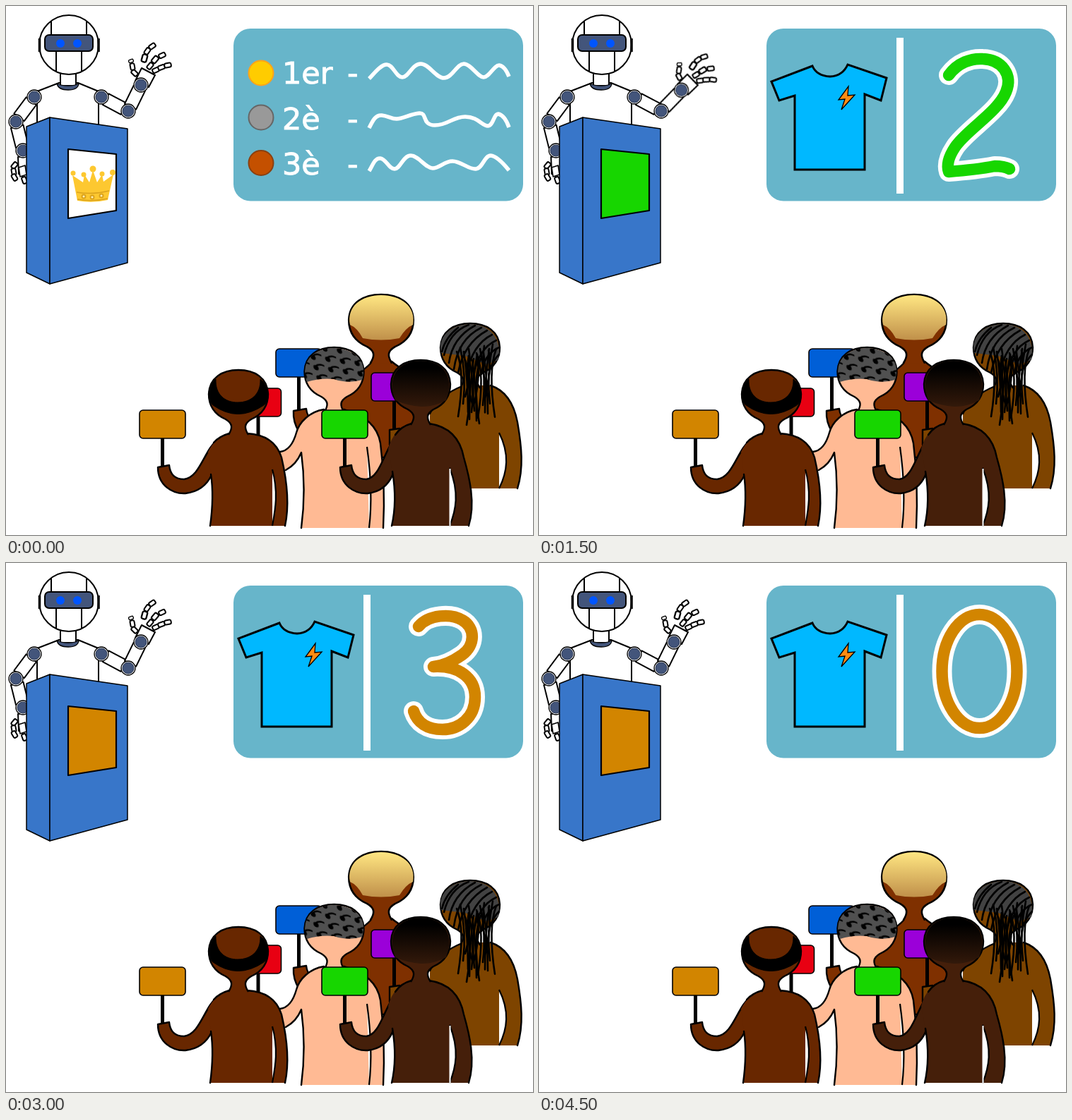
Write an HTML page without scripts that moves like this. It is 746 by 750 pixels and loops after 5000 ms.

```html
<!DOCTYPE html>
<html lang="fr">
<head>
<meta charset="utf-8">
<title>Enchères</title>
<style>
  html, body { margin: 0; width: 100%; height: 100%; overflow: hidden; background: #fff; }
  svg { display: block; width: 100vw; height: 100vh; }
  .line { fill: none; stroke: #000; stroke-linecap: round; }
  .robot { fill: #fff; stroke: #000; stroke-width: 2; stroke-linejoin: round; }
  .people { stroke: #000; stroke-width: 2.4; stroke-linejoin: round; }
  .skin { fill: currentColor; }
  .bare { stroke: none; }
  .gap { fill: #fff; stroke-width: 2.2; }
  .text { font: 43px "DejaVu Sans", sans-serif; fill: #fff; stroke: #fff; stroke-width: .9; }
  .wave { fill: none; stroke: #fff; stroke-width: 5.5; }
  .digit { fill: none; stroke-linecap: round; stroke-linejoin: round; }
  .rim { stroke: #fff; stroke-width: 28px; }
  .ink { stroke: currentColor; stroke-width: 16.5px; }

  .fore, .screen, .lot, .list, .sale, .three, .two, .one, .zero,
  .g-up, .g-down, .o-up, .o-down { animation: 5s step-end infinite; }
  .fore { transform-origin: 173px 149px; animation-name: fore; }
  .screen { animation-name: screen; }
  .lot { animation-name: lot; }
  .list { animation-name: list; }
  .sale { animation-name: sale; }
  .three { animation-name: three; }
  .two { animation-name: two; }
  .one { animation-name: one; }
  .zero { animation-name: zero; }
  .g-up { animation-name: g-up; }
  .g-down { animation-name: g-down; }
  .o-up { animation-name: o-up; }
  .o-down { animation-name: o-down; }

  @keyframes fore {
    0%, 60%, 100% { transform: rotate(0deg); }
    10%, 50% { transform: rotate(101deg); }
    20% { transform: rotate(18deg); }
  }
  @keyframes screen { 0%, 100% { fill: #fff; } 10% { fill: #17d600; } 50% { fill: #d28500; } }
  @keyframes lot { 0%, 100% { color: #17d600; } 50% { color: #d28500; } }
  @keyframes list { 0% { opacity: 1; } 10%, 100% { opacity: 0; } }
  @keyframes sale { 0% { opacity: 0; } 10%, 100% { opacity: 1; } }
  @keyframes three { 0%, 30%, 70%, 100% { opacity: 0; } 10%, 50% { opacity: 1; } }
  @keyframes two {
    0%, 40%, 80%, 100% { opacity: 0; transform: none; }
    30% { opacity: 1; transform: none; }
    70% { opacity: 1; transform: translateX(6px); }
  }
  @keyframes one { 0%, 50%, 90%, 100% { opacity: 0; } 40%, 80% { opacity: 1; } }
  @keyframes zero { 0% { opacity: 0; } 90%, 100% { opacity: 1; } }
  @keyframes g-up { 0%, 20%, 100% { opacity: 0; } 10% { opacity: 1; } }
  @keyframes g-down { 0%, 20%, 100% { opacity: 1; } 10% { opacity: 0; } }
  @keyframes o-up { 0%, 60%, 100% { opacity: 0; } 50% { opacity: 1; } }
  @keyframes o-down { 0%, 60%, 100% { opacity: 1; } 50% { opacity: 0; } }
</style>
</head>
<body>
<svg viewBox="0 0 746 750" preserveAspectRatio="none">
  <defs>
    <linearGradient id="blond" x2="0" y2="1">
      <stop stop-color="#ffe682"/><stop offset="1" stop-color="#c0904a"/>
    </linearGradient>
    <linearGradient id="fade" x2="0" y2="1">
      <stop offset=".15"/><stop offset="1" stop-color="#33190a"/>
    </linearGradient>
    <pattern id="curls" width="21" height="14" patternUnits="userSpaceOnUse" patternTransform="translate(428 488) rotate(8) skewX(24)">
      <rect width="21" height="14" fill="#505050"/>
      <path d="M3 9Q8 2 17 5" fill="none" stroke="#000" stroke-width="2.400"/>
      <circle cx="4" cy="9" r="3.600"/>
    </pattern>

    <rect id="limb" x="7" y="-9" width="29" height="18"/>
    <g id="joint"><circle r="10" stroke-width="1.300"/><circle r="8" fill="#43557b" stroke="#26334f" stroke-width="1"/></g>
    <rect id="seg" x="-4.700" y="-3" width="9.400" height="6" rx="2" stroke-width="2"/>

    <path id="d3" d="M584 90C598 73 630 71 646 81C665 92 664 117 646 130C633 139 618 146 605 147C640 145 664 162 664 190C664 220 641 236 618 236C596 236 582 226 577 210"/>
    <path id="d2" d="M580 98C593 80 612 74 628 75C656 76 671 98 661 122C650 150 605 176 589 200C579 215 577 226 580 235Q620 232 645 227Q658 227 666 231"/>
    <path id="d1" d="M591 102Q612 92 627 72C631 95 618 130 622 160Q624 195 619 229M592 232Q620 229 645 230"/>
    <ellipse id="d0" cx="623.500" cy="153.500" rx="53" ry="80.500"/>

    <g id="sign">
      <path d="M0-42V7" stroke-width="5"/>
      <rect x="-32.500" y="-80" width="65" height="40" rx="5" fill="currentColor" stroke-width="1.600"/>
    </g>
    <path id="head" class="skin" d="M-14 92C-8 82 -8 76 -18 70C-36 62 -42 49 -42 34C-41 11-23 0 0 0S41 11 42 34C42 49 36 62 18 70C8 76 8 82 14 92"/>
    <path id="lock" d="M0 0Q12 30 2 92M5-6Q14 35 9 74M10 0Q16 40 16 86M17-4Q22 25 12 64"/>
  </defs>

  <!-- Robot -->
  <g class="robot">
    <path d="M44 121L75 109H102L131 121V174H44Z"/>
    <path d="M77 94V113H99V94Z"/>
    <path d="M72 110Q74 119 88 119T103 110Q98 113 88 113T72 110Z" fill="#43557b" stroke-width="1.300"/>
    <circle cx="89" cy="55" r="42"/>
    <path d="M64 21V42M114 21V42M71 63V93M107 63V93"/>
    <path d="M47.500 46V65M131 46V65" stroke-width="3.500"/>
    <rect x="55" y="41" width="68" height="23" rx="6" fill="#43557b"/>
    <g fill="#0055ff" stroke="none"><circle cx="77" cy="53" r="6"/><circle cx="101" cy="53" r="6"/></g>

    <use href="#limb" transform="translate(40 129) rotate(126.600)"/>
    <use href="#limb" transform="translate(14 164) rotate(76)"/>
    <path d="M17 214L18 238L34 250V212Z"/>
    <path d="M18 229L27 226L29 239L20 242Z" stroke-width="1.600"/>
    <use href="#seg" transform="translate(12 226) rotate(-50)"/>
    <use href="#seg" transform="translate(11 235) rotate(80)"/>
    <use href="#seg" transform="translate(12 243) rotate(60)"/>
    <use href="#seg" transform="translate(26 247) rotate(70)"/>
    <use href="#joint" x="40" y="129"/>
    <use href="#joint" x="14" y="164"/>
    <use href="#joint" x="24" y="205"/>

    <use href="#limb" transform="translate(135 129) rotate(27.800)"/>
    <use href="#joint" x="135" y="129"/>
    <g class="fore">
      <use href="#limb" transform="translate(173 149) rotate(-64)"/>
      <path d="M192 88L211 98L202 115L183 106Z"/>
      <use href="#joint" x="191" y="112"/>
      <use href="#seg" transform="translate(182 95) rotate(45)"/>
      <use href="#seg" transform="translate(179 86) rotate(80)"/>
      <use href="#seg" transform="translate(177 78) rotate(-20) scale(.7)"/>
      <use href="#seg" transform="translate(196 74) rotate(-75) scale(1.150)"/>
      <use href="#seg" transform="translate(200 64) rotate(-55)"/>
      <use href="#seg" transform="translate(207 57) rotate(-35)"/>
      <use href="#seg" transform="translate(204 85) rotate(-50)"/>
      <use href="#seg" transform="translate(211 76) rotate(-50) scale(1.100)"/>
      <use href="#seg" transform="translate(221 70) rotate(-25)"/>
      <use href="#seg" transform="translate(212 91) rotate(-25)"/>
      <use href="#seg" transform="translate(220 87) rotate(-20)"/>
      <use href="#seg" transform="translate(229 84) rotate(-10)"/>
    </g>
    <use href="#joint" x="173" y="149"/>

    <g fill="#3876c9" stroke-width="1.500">
      <path d="M29 171L62 158V394L29 378Z"/>
      <path d="M62 158L172 174V364L62 394Z"/>
    </g>
    <path class="screen" d="M88 203L156 210V290L88 301Z" stroke-width="2.200"/>
    <g class="list" fill="#fdc830" stroke="none">
      <path d="M101 276L94 240L109 250L111 239L118 250L123 233L129 250L136 239L138 249L152 239L144 275Q122 280 101 276Z"/>
      <circle cx="95" cy="237" r="3.500"/><circle cx="110" cy="239" r="3.500"/><circle cx="123" cy="231" r="4.500"/>
      <circle cx="136" cy="238" r="3.500"/><circle cx="151" cy="236" r="4"/>
      <path d="M100 264Q122 268 146 262M101 274Q122 278 144 273" fill="none" stroke="#dba31d" stroke-width="1.500"/>
      <g fill="#fff0b8" stroke="#dba31d"><circle cx="110" cy="270" r="2.500"/><circle cx="122" cy="271" r="2.500"/><circle cx="135" cy="269" r="2.500"/></g>
    </g>
  </g>

  <!-- Board -->
  <rect x="322" y="32" width="410" height="244.500" rx="24" fill="#67b5ca"/>
  <g class="list">
    <g stroke-width="2">
      <circle cx="361" cy="95" r="17.500" fill="#ffcc00" stroke="#ffa31a"/>
      <circle cx="361" cy="158" r="17.500" fill="#999" stroke="#666"/>
      <circle cx="361" cy="222.500" r="17.500" fill="#c45000" stroke="#8a4010"/>
    </g>
    <g class="text">
      <text x="391" y="110">1er</text><text x="483" y="110">-</text>
      <text x="391" y="175">2è</text><text x="483" y="175">-</text>
      <text x="391" y="239">3è</text><text x="483" y="239">-</text>
    </g>
    <g class="wave">
      <path d="M514 103C521 96 530 83 539 83S552 101 561 101S575 82 587 82S608 102 620 102S638 82 648 82S668 101 676 101S691 84 698 84Q706 85 712 100"/>
      <path d="M514 173C519 163 523 154 532 155S545 160 553 160S573 153 585 152S588 169 607 169S632 157 650 157S674 170 682 170S690 153 697 153Q706 155 712 172"/>
      <path d="M514 234C519 226 522 215 530 216S542 231 550 231S562 212 573 212S594 230 604 230S620 220 632 220S655 232 665 231S677 212 686 212Q696 213 712 233"/>
    </g>
  </g>
  <g class="sale">
    <path d="M511 45V266" stroke="#fff" stroke-width="10"/>
    <path d="M387 85Q393 99 412 100Q430 99 437 83L492 102L484 134L461 125V232H362V127L340 134L329 107Z" fill="#00b8ff" stroke="#000" stroke-width="3"/>
    <path d="M438 114L424 133L433 132L428 147L447 126L437 127Z" fill="#ff8c12" stroke="#000" stroke-width="1.300"/>
  </g>
  <g class="lot digit">
    <g class="three"><use href="#d3" class="rim"/><use href="#d3" class="ink"/></g>
    <g class="two"><use href="#d2" class="rim"/><use href="#d2" class="ink"/></g>
    <g class="one"><use href="#d1" class="rim"/><use href="#d1" class="ink"/></g>
    <g class="zero"><use href="#d0" class="rim"/><use href="#d0" class="ink"/></g>
  </g>

  <!-- Audience -->
  <g class="people">
    <!-- blond -->
    <g color="#7f3000">
      <use href="#sign" x="414.500" y="566" color="#005fd7"/>
      <path class="skin" d="M407 574L425 571Q426 582 434 588L415 604Q406 590 407 574Z"/>
      <path class="skin" d="M518 504C510 518 475 528 474 560V640H590V530Q560 516 546 504Z"/>
      <use href="#head" transform="translate(531 409) scale(1.090 1.060)"/>
      <path d="M487 452C482 426 503 410 531 410S581 426 576 452Q566 456 557 471Q531 476 505 471Q497 456 487 452Z" fill="url(#blond)" class="bare"/>
    </g>

    <!-- dreadlocks -->
    <g color="#7e4400">
      <use href="#sign" x="549.500" y="600" color="#9b00d9"/>
      <path class="skin" d="M543 601L557 599V622H543Z"/>
      <path class="skin bare" d="M600 578Q612 552 648 538H686Q716 546 724 590C730 625 733 655 724 684H600Z"/>
      <path class="line" d="M600 578Q612 552 648 538M686 538Q716 548 724 590C730 625 733 655 724 684"/>
      <path class="gap" d="M698 605C713 635 710 660 698 684"/>
      <use href="#head" x="657" y="450"/>
      <path d="M616 492C610 466 634 451 657 451S703 466 697 502L680 508L650 496Z" fill="#424242" class="bare"/>
      <g class="line" stroke-width="2.600">
        <path d="M655 452Q628 462 620 495M664 453Q632 470 627 506M673 456Q640 472 634 515M681 460Q648 478 640 520M688 466Q660 480 652 522M694 474Q668 486 662 525M698 484Q676 494 673 522M640 456Q622 470 617 490M698 494Q684 508 683 530"/>
        <use href="#lock" x="638" y="490"/>
        <use href="#lock" x="650" y="502"/>
        <use href="#lock" x="666" y="492"/>
        <use href="#lock" transform="translate(694 486) scale(-1 1.050)"/>
        <use href="#lock" transform="translate(672 500) scale(-1 1)"/>
      </g>
    </g>

    <!-- curly -->
    <g color="#ffba94">
      <use href="#sign" x="357" y="622" color="#e80012"/>
      <path class="skin bare" d="M450 572C430 575 415 590 411 605Q404 630 388 632V660Q410 655 418 633C423 670 422 710 418 740H534C536 700 535 660 530 620Q524 584 478 572Z"/>
      <path class="line" d="M450 572C430 575 415 590 411 605Q404 630 388 632M396 658Q411 650 418 633C423 670 422 710 418 740M478 572Q524 584 530 620C535 660 536 700 534 740"/>
      <path class="gap" d="M511 625Q520 690 514 740"/>
      <use href="#head" x="464.500" y="484"/>
      <path d="M426 533C415 500 440 485 464 485S514 500 504 530Q485 536 464 529Q445 527 426 533Z" fill="url(#curls)" class="bare"/>
    </g>

    <!-- bald -->
    <g color="#682700">
      <g class="o-down">
        <use href="#sign" x="221.500" y="653" color="#d28500"/>
        <path class="skin" d="M300 614C280 630 275 668 252 671Q233 671 231 651L215 654C215 680 236 692 254 691Q280 688 291 665"/>
      </g>
      <g class="o-up">
        <use href="#sign" x="221.500" y="622" color="#d28500"/>
        <path class="skin" d="M300 614C280 630 275 653 254 653Q234 650 231 621L215 623C215 655 238 678 258 678Q280 677 291 663"/>
      </g>
      <path class="skin bare" d="M316 606Q297 611 286 632L290 664C294 690 292 715 289 737H395C402 705 397 670 390 640Q380 608 341 606Z"/>
      <path class="line" d="M316 606Q302 610 294 619M290 664C294 690 292 715 289 737M341 606Q380 608 390 640C397 670 402 705 395 737"/>
      <path class="gap" d="M377 657C386 690 381 715 377 737"/>
      <use href="#head" x="329" y="516"/>
      <path d="M297 529C284 541 284 558 293 566Q328 591 365 566C374 558 374 541 360 529C361 551 346 562 328 562S296 551 297 529Z" stroke-width="1"/>
    </g>

    <!-- dark hair -->
    <g color="#451f0a">
      <g class="g-down">
        <use href="#sign" x="479.500" y="653" color="#17d600"/>
        <path class="skin" d="M562 601C535 620 533 668 510 671Q491 671 489 651L473 654C473 680 494 692 512 691Q538 688 548 663"/>
      </g>
      <g class="g-up">
        <use href="#sign" x="479.500" y="629" color="#17d600"/>
        <path class="skin" d="M562 601C535 620 534 656 512 657Q492 655 489 627L473 630C473 658 496 677 514 676Q538 673 548 658"/>
      </g>
      <path class="skin bare" d="M574 592Q548 600 541 628L547 660C552 690 551 715 546 737H655C665 705 656 668 648 640Q640 598 599 592Z"/>
      <path class="line" d="M574 592Q559 596 551 608M547 660C552 690 551 715 546 737M599 592Q640 598 648 640C656 668 665 705 655 737"/>
      <path class="gap" d="M628 655C642 690 637 715 628 737"/>
      <path class="bare" d="M627.500 656H629.500V737H627.500Z" fill="#fff"/>
      <use href="#head" x="587" y="502"/>
      <path d="M551 559C538 525 556 503 587 503S636 525 623 559Q605 569 587 568T551 559Z" fill="url(#fade)" class="bare"/>
    </g>
  </g>
</svg>
</body>
</html>
```
